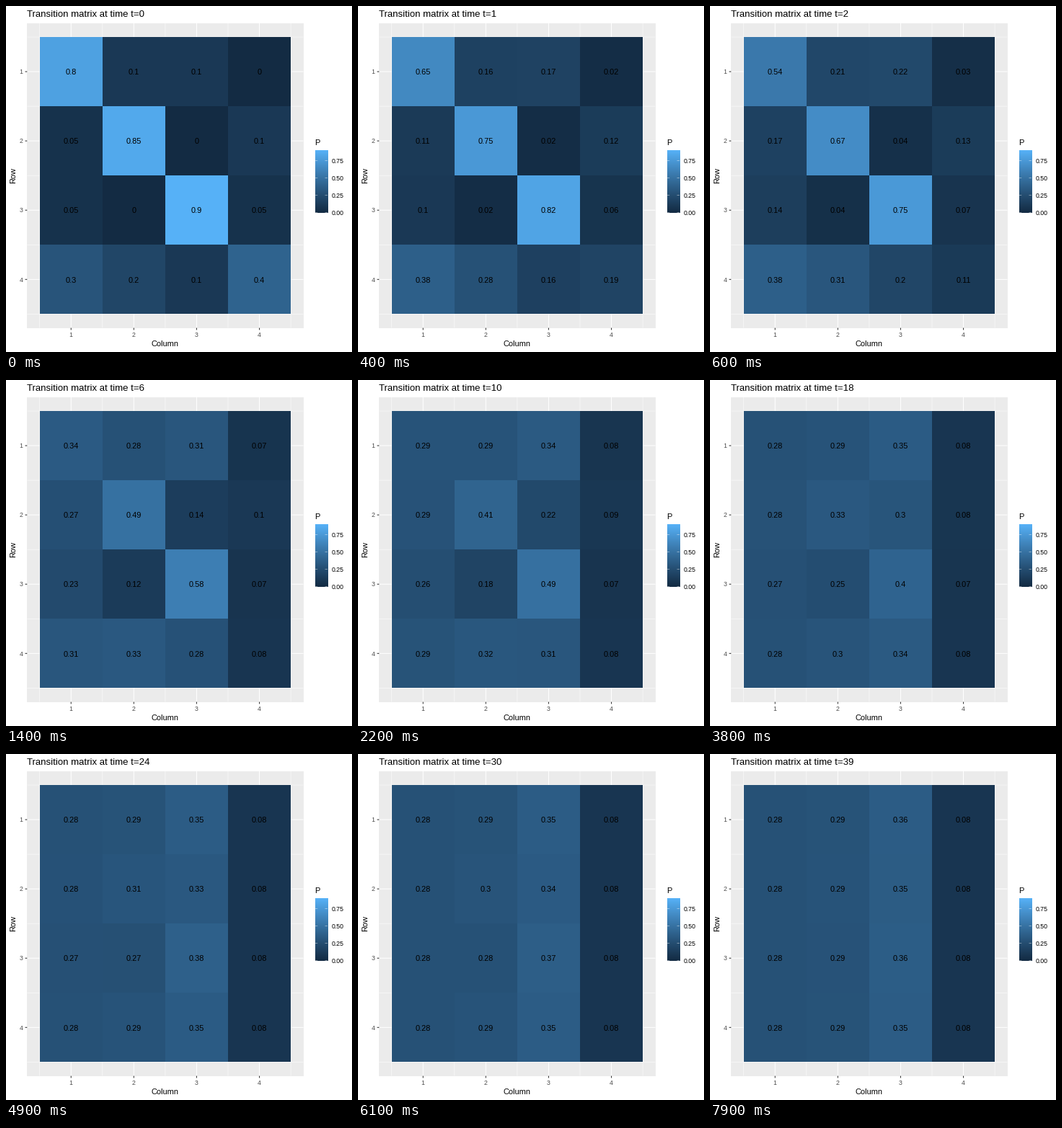
Recreate the animation shown at these times as a matplotlib script. Size 480x480 px, loop 8000 ms.

```python
import numpy as np
import matplotlib.pyplot as plt
from matplotlib.animation import FuncAnimation
from matplotlib.patches import Rectangle

SIZE, DPI = 480, 80
FRAMES, INTERVAL = 80, 100

P = np.array([[0.80, 0.10, 0.10, 0.00],
              [0.05, 0.85, 0.00, 0.10],
              [0.05, 0.00, 0.90, 0.05],
              [0.30, 0.20, 0.10, 0.40]])
P_MAX = 0.9

# Panel edges in pixels; both axes span 0.3 to 4.7
LEFT, RIGHT, TOP, BOTTOM = 29.3, 412.5, 23.8, 446.6
LOW, HIGH = (0x13, 0x2B, 0x43), (0x56, 0xB1, 0xF7)

TO_XYZ = np.array([[0.4124564, 0.3575761, 0.1804375],
                   [0.2126729, 0.7151522, 0.0721750],
                   [0.0193339, 0.1191920, 0.9503041]])
WHITE = TO_XYZ.sum(axis=1)
TO_LAB = np.array([[0, 116, 0], [500, -500, 0], [0, 200, -200]])
LAB_SHIFT = np.array([-16, 0, 0])

plt.rcParams["font.family"] = "Liberation Sans"


def rgb_to_lab(rgb):
    c = np.array(rgb) / 255
    linear = np.where(c > 0.04045, ((c + 0.055) / 1.055) ** 2.4, c / 12.92)
    xyz = TO_XYZ @ linear / WHITE
    f = np.where(xyz > 0.008856, np.cbrt(xyz), 7.787 * xyz + 16 / 116)
    return TO_LAB @ f + LAB_SHIFT


def lab_to_rgb(lab):
    f = np.linalg.solve(TO_LAB, lab - LAB_SHIFT)
    xyz = np.where(f > 0.206893, f ** 3, (f - 16 / 116) / 7.787) * WHITE
    linear = np.clip(np.linalg.solve(TO_XYZ, xyz), 0, 1)
    c = np.where(linear > 0.0031308,
                 1.055 * linear ** (1 / 2.4) - 0.055, 12.92 * linear)
    return np.clip(c, 0, 1)


LAB_LOW, LAB_HIGH = rgb_to_lab(LOW), rgb_to_lab(HIGH)


def fill_color(p):
    return lab_to_rgb(LAB_LOW + (LAB_HIGH - LAB_LOW) * p / P_MAX)


def px_x(col):
    return LEFT + (col - 0.3) / 4.4 * (RIGHT - LEFT)


def px_y(row):
    return TOP + (row - 0.3) / 4.4 * (BOTTOM - TOP)


fig = plt.figure(figsize=(SIZE / DPI, SIZE / DPI), dpi=DPI, facecolor="white")
ax = fig.add_axes([0, 0, 1, 1])


def text(x, y, s, px, color="black", ha="left", **kw):
    return ax.text(x, y, s, fontsize=px * 72 / DPI, color=color, ha=ha,
                   va="baseline", **kw)


def line(xs, ys, px, color, z):
    ax.plot(xs, ys, color=color, lw=px * 72 / DPI, zorder=z,
            solid_capstyle="butt", snap=False)


def rect(x0, y0, x1, y1, color, z):
    patch = Rectangle((x0, y0), x1 - x0, y1 - y0, facecolor=color,
                      linewidth=0, antialiased=False, zorder=z)
    return ax.add_patch(patch)


def draw_panel():
    rect(LEFT, TOP, RIGHT, BOTTOM, "#EBEBEB", 0)
    for k in np.arange(0.5, 4.6, 0.5):
        width = 1.07 if k % 1 == 0 else 0.53
        line([px_x(k)] * 2, [TOP, BOTTOM], width, "white", 1)
        line([LEFT, RIGHT], [px_y(k)] * 2, width, "white", 1)
    for k in range(1, 5):
        x, y = px_x(k), px_y(k)
        line([x, x], [BOTTOM, BOTTOM + 2.75], 1.07, "#333333", 1)
        line([LEFT - 2.75, LEFT], [y, y], 1.07, "#333333", 1)
        text(x, 459, str(k), 8.8, "#4D4D4D", "center")
        text(23.6, y + 3.2, str(k), 8.8, "#4D4D4D", "right")
    text((LEFT + RIGHT) / 2 - 0.5, 472, "Column", 11, ha="center")
    text(13.4, (TOP + BOTTOM) / 2 - 0.5, "Row", 11, ha="center",
         rotation=90, rotation_mode="anchor")


def draw_legend():
    x0, x1, y0, y1 = 428.7, 446, 200.3, 286.7
    ramp = np.array([[fill_color(p)] for p in np.linspace(P_MAX, 0, 87)])
    ax.imshow(ramp, extent=(x0, x1, y1, y0), aspect="auto",
              interpolation="nearest", zorder=1)
    tick = (x1 - x0) / 5
    for p in (0, 0.25, 0.5, 0.75):
        y = y1 - p / P_MAX * (y1 - y0)
        line([x0, x0 + tick], [y, y], 0.4, "white", 2)
        line([x1 - tick, x1], [y, y], 0.4, "white", 2)
        text(452, y + 3.2, f"{p:.2f}", 8.8)
    text(428.4, 193, "P", 11)


draw_panel()
draw_legend()
title = text(29, 15, "", 13.2)
cells = []
for r in range(4):
    for c in range(4):
        tile = rect(px_x(c + 0.5), px_y(r + 0.5),
                    px_x(c + 1.5), px_y(r + 1.5), "black", 3)
        label = text(px_x(c + 1), px_y(r + 1) + 4.2, "", 11, ha="center",
                     zorder=4)
        cells.append((tile, label))

ax.set_xlim(0, SIZE)
ax.set_ylim(SIZE, 0)
ax.axis("off")


def matrix_at(t):
    return np.linalg.matrix_power(P, t + 1)


def update(frame):
    # Fills blend half-way on odd frames; labels wait for the full step
    pos = max(0, frame / 2 - 1)
    step = int(pos)
    mix = pos - step
    now = matrix_at(step)
    blend = now + (matrix_at(step + 1) - now) * mix
    title.set_text(f"Transition matrix at time t={max(0, (frame - 1) // 2)}")
    for (tile, label), p, shade in zip(cells, now.flat, blend.flat):
        tile.set_facecolor(fill_color(shade))
        label.set_text(f"{round(p, 2):g}")
    return []


anim = FuncAnimation(fig, update, frames=FRAMES, interval=INTERVAL,
                     repeat=True, repeat_delay=0)
plt.show()
```
